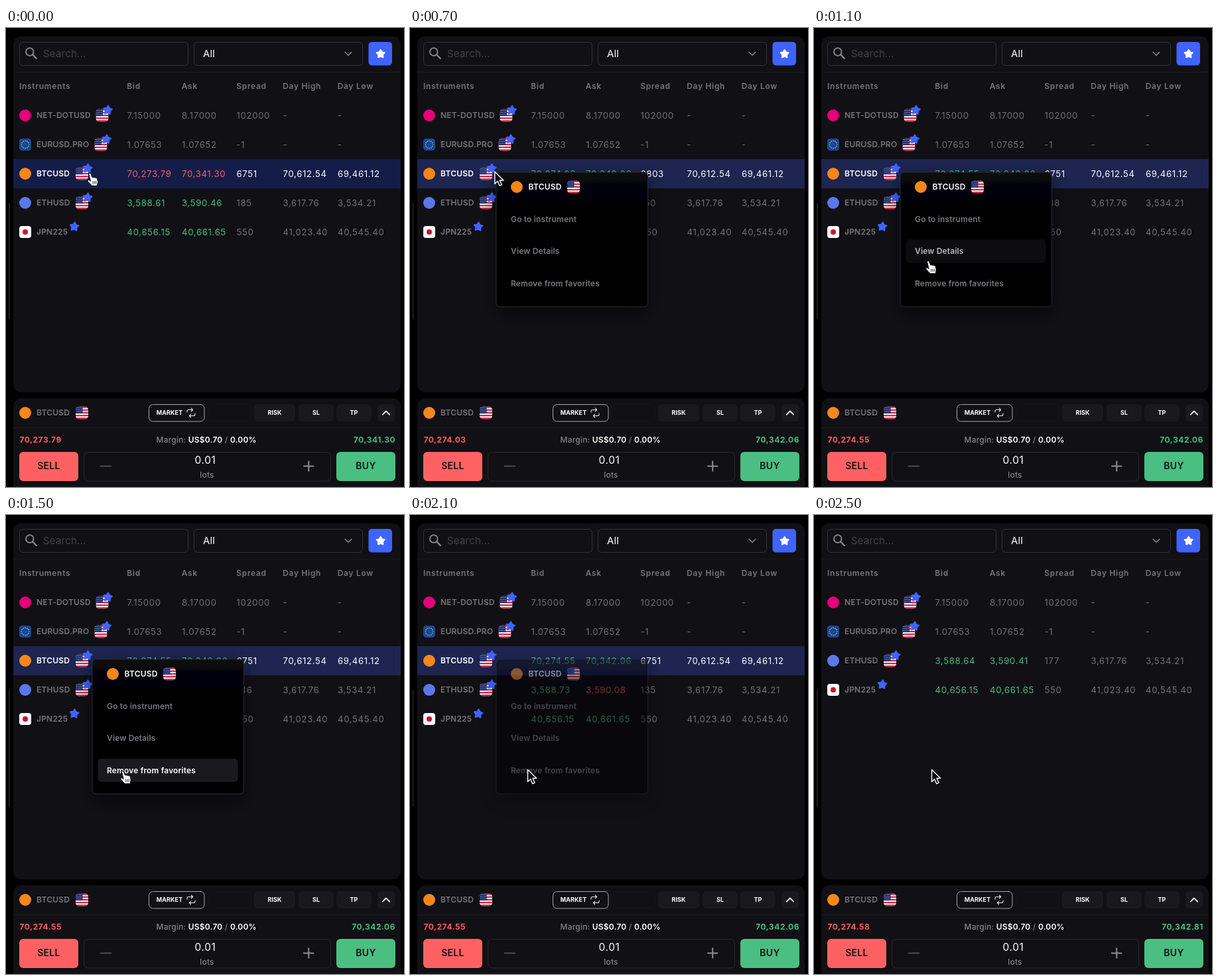
An HTML page for the animation above (2.6 s loop, 600 by 693 pixels).

```html
<!DOCTYPE html>
<html lang="en">
<head>
<meta charset="utf-8">
<title>Watchlist</title>
<style>
html, body { margin: 0; width: 100%; height: 100%; overflow: hidden; background: #000; }
svg { display: block; width: 600px; height: 693px; font-family: Inter, sans-serif; }
text { white-space: pre; }
.head { font-size: 12px; font-weight: 600; letter-spacing: .7px; fill: #75747a; }
.name { font-size: 12px; font-weight: 600; letter-spacing: .2px; fill: #75747a; }
.num { font-size: 13.2px; letter-spacing: .65px; fill: #717076; }
.item { font-size: 12px; font-weight: 600; letter-spacing: .15px; }
.price { font-size: 12px; font-weight: 700; letter-spacing: .5px; }
.margin { font-size: 12px; font-weight: 500; letter-spacing: .2px; fill: #85848a; }
.tiny { font-size: 9px; font-weight: 700; letter-spacing: .1px; fill: #fff; text-anchor: middle; }
.trade { font-size: 14px; font-weight: 600; letter-spacing: .3px; fill: #111015; text-anchor: middle; }
.line { fill: none; stroke-linecap: round; stroke-linejoin: round; }
</style>
</head>
<body>
<svg id="stage" viewBox="0 0 600 693"></svg>
<script>
const LOOP = 2600, STEP = 100;
const RED = '#ff5a5e', GREEN = '#41c07c', BLUE = '#3f64ff', WHITE = '#fff', GRAY = '#717076';
const COLS = [182.5, 265, 347.5, 417.5, 500];

const text = (x, y, str, cls, extra = '') => `<text x="${x}" y="${y}" class="${cls}" ${extra}>${str}</text>`;
const box = (x, y, w, h, r, fill, extra = '') =>
  `<rect x="${x}" y="${y}" width="${w}" height="${h}" rx="${r}" fill="${fill}" ${extra}/>`;
const line = (d, color, w) => `<path class="line" d="${d}" stroke="${color}" stroke-width="${w}"/>`;
const dot = (x, y, r, fill) => `<circle cx="${x}" cy="${y}" r="${r}" fill="${fill}"/>`;

function star(x, y, r, fill, turn = 0) {
  const pts = Array.from({ length: 10 }, (_, i) => {
    const a = i * Math.PI / 5 - Math.PI / 2 + turn, q = i % 2 ? r * .56 : r;
    return `${(x + q * Math.cos(a)).toFixed(2)},${(y + q * Math.sin(a)).toFixed(2)}`;
  });
  return `<polygon points="${pts.join(' ')}" fill="${fill}" stroke="${fill}" stroke-width="2" stroke-linejoin="round"/>`;
}

function usFlag(x, y) {
  let s = `<g transform="translate(${x - 9.5} ${y - 9.5})" clip-path="url(#flag)">` + box(0, 0, 19, 19, 0, '#f4f1f4');
  for (let i = 0; i < 5; i++) s += box(0, i * 4.2, 19, 2.1, 0, '#d5203f');
  s += box(0, 0, 10.5, 10.4, 0, '#1c2f70');
  for (let i = 0; i < 12; i++) s += dot(1.8 + i % 4 * 2.3, 2 + Math.floor(i / 4) * 3, .5, '#c9d0ea');
  return s + '</g>';
}

function euFlag(x, y) {
  let s = box(x - 9, y - 9, 18, 18, 4.5, '#17479e');
  for (let i = 0; i < 12; i++) {
    const a = i * Math.PI / 6;
    s += dot(x + 5.6 * Math.cos(a), y + 5.6 * Math.sin(a), .85, '#a9b84a');
  }
  return s;
}

const ROWS = [
  { id: 'dot', name: 'NET-DOTUSD', icon: dot(29, 0, 9, '#e6007a'), flag: 145, vals: ['7.15000', '8.17000', '102000', '-', '-'] },
  { id: 'eur', name: 'EURUSD.PRO', icon: euFlag(29, 0), flag: 143, vals: ['1.07653', '1.07652', '-1', '-', '-'] },
  { id: 'btc', name: 'BTCUSD', icon: dot(29, 0, 9, '#f7861b'), flag: 114.5, vals: ['', '', '', '70,612.54', '69,461.12'] },
  { id: 'eth', name: 'ETHUSD', icon: dot(29, 0, 9, '#5b78ea'), flag: 114.5, vals: ['', '', '', '3,617.76', '3,534.21'] },
  { id: 'jpn', name: 'JPN225', icon: box(20, -9, 18, 18, 4, WHITE) + dot(29, 0, 4, '#c8102e'), star: 103,
    vals: ['40,656.15', '40,661.65', '550', '41,023.40', '40,545.40'] }
];

function row(r) {
  const active = r.id === 'btc';
  const cells = r.vals.map((v, i) => {
    const fill = r.id === 'jpn' && i < 2 ? GREEN : active ? WHITE : GRAY;
    return text(COLS[i], 4.8, v, 'num', `id="${r.id}${i}" style="fill:${fill}"`);
  }).join('');
  return `<g id="${r.id}">` + (active ? box(11, -22, 584, 44, 0, '#141d47', 'id="glow"') : '') +
    r.icon + text(46, 4.4, r.name, 'name', active ? 'style="fill:#fff"' : '') +
    (r.flag ? usFlag(r.flag, 0) : '') + star(r.star || r.flag + 8.5, -8, 6.7, BLUE, .1) + cells + '</g>';
}

const ITEMS = ['Go to instrument', 'View Details', 'Remove from favorites'];
const menu = '<g id="menu">' +
  box(130, 218, 228.5, 203, 6, 'url(#shade)', 'stroke="#2b2b30" filter="url(#drop)"') +
  dot(161, 240, 9, '#f7861b') + text(178.5, 244.4, 'BTCUSD', 'name', 'style="fill:#fff"') + usFlag(246.5, 240) +
  ITEMS.map((s, i) => box(138.5, 271 + i * 48.5, 211, 35, 5, '#1a191e', `id="hover${i}"`) +
    text(152, 292.6 + i * 48.5, s, 'item', `id="item${i}"`)).join('') + '</g>';

const chip = (x, w, label) => box(x, 568, w, 26, 6, '#1a191e') + text(x + w / 2, 584.3, label, 'tiny');

const order = box(11, 559, 584, 150, 12, '#111015') + box(11, 603, 584, 1, 0, '#1b1a1f') +
  dot(29, 581, 9, '#f7861b') + text(46, 585.4, 'BTCUSD', 'name') + usFlag(114.5, 581) +
  box(215.5, 568.5, 83.5, 25.5, 6, '#111015', 'stroke="#a6a5aa"') + text(246.5, 584.3, 'MARKET', 'tiny') +
  line('M273 580v-1.5q0-2 2-2h6.5M279.3 574.2l2.3 2.3-2.3 2.3M285 582v1.5q0 2-2 2h-6.5M278.7 583.2l-2.3 2.3 2.3 2.3', '#e8e8ea', 1.1) +
  box(304.5, 568.5, 65, 25, 6, 'none', 'stroke="#16151a"') +
  chip(374, 62, 'RISK') + chip(441, 53, 'SL') + chip(498, 53, 'TP') + box(560, 568, 26.5, 26, 6, '#1a191e') +
  line('M567.8 583.7l5.2-5.2 5.2 5.2', WHITE, 1.8) +
  text(20.5, 626, '', 'price', `id="sell" fill="${RED}"`) +
  text(587, 626, '', 'price', `id="buy" fill="${GREEN}" text-anchor="end"`) +
  text(226.5, 626, 'Margin: <tspan fill="#fff" font-weight="600">US$0.70</tspan> / <tspan fill="#fff" font-weight="600">0.00%</tspan>', 'margin') +
  box(20, 640, 89, 44, 6, '#ff6163') + text(64.5, 666, 'SELL', 'trade') +
  box(498, 640, 89, 44, 6, '#4abf81') + text(542.5, 666, 'BUY', 'trade') +
  box(117.5, 640.5, 372, 43.5, 6, '#111015', 'stroke="#29282d"') +
  line('M142.5 661.5h16', '#4b4a50', 2) + line('M449 661.5h14.5M456.3 654.3v14.5', '#8f8e94', 2) +
  text(300.5, 658, '0.01', 'num', 'text-anchor="middle" style="font-size:15.5px;fill:#fff"') +
  text(303, 679, 'lots', 'margin', 'text-anchor="middle"');

const list = box(11, 12.5, 584, 537.5, 12, '#111015') + box(11, 66, 584, 1, 0, '#1a191e') +
  box(20.5, 21.5, 254, 35, 5, '#111015', 'stroke="#333238"') +
  '<circle cx="35.8" cy="36" r="5.8" fill="none" stroke="#85848a" stroke-width="2"/>' +
  line('M40.3 40.5l5.4 5.4', '#85848a', 2.4) +
  text(56, 44, 'Search...', '', 'font-size="15" letter-spacing=".2" fill="#424147"') +
  box(283.5, 21.5, 254, 35, 5, '#111015', 'stroke="#333238"') +
  text(297, 43.6, 'All', '', 'font-size="15" letter-spacing=".1" fill="#fff"') +
  line('M511.2 36.5l4.8 4.8 4.8-4.8', '#85848a', 1.6) +
  box(546.5, 21, 35.5, 35.5, 5, BLUE) + star(564.7, 39.2, 6.3, WHITE) +
  ['Instruments', 'Bid', 'Ask', 'Spread', 'Day High', 'Day Low']
    .map((s, i) => text(i ? COLS[i - 1] - .3 : 20, 92, s, 'head')).join('');

const cursors = '<g id="cursor">' +
  '<path id="arrow" d="M0 0v18.2l4.2-4 3 7 3.3-1.4-2.9-6.8h5.6z" fill="#0c0c0e" stroke="#fff" stroke-width="1.4" stroke-linejoin="round"/>' +
  '<g id="hand" transform="translate(-6 2)"><path d="M3.2 2c-.3-2 2.4-2.4 3-.6l2 5.3c.5-1 2.2-1 2.5.3.7-.9 2.2-.7 2.5.6.9-.8 2.4-.3 2.6 1.2l.8 4c.3 2-.8 3.2-.8 6.4H7.2c-.6-2-3.3-3.600-5.300-6.200-1.400-1.800.6-3.300 2.300-1.900l1.500 1.100z" fill="#fff" stroke="#08080a" stroke-width="1"/>' +
  '<path d="M9 12.500l.3 4M11.400 12.300l.3 4M13.700 12.100l.2 4" stroke="#111" stroke-width=".9"/></g></g>';

const stage = document.getElementById('stage');
stage.innerHTML = '<defs><clipPath id="flag"><rect width="19" height="19" rx="5"/></clipPath>' +
  '<linearGradient id="shade" x2="0" y2="1"><stop stop-color="#08080e"/><stop offset=".3" stop-color="#020203"/><stop offset="1" stop-color="#000"/></linearGradient>' +
  '<filter id="drop" x="-20%" y="-20%" width="140%" height="150%"><feDropShadow dx="0" dy="10" stdDeviation="12" flood-color="#000" flood-opacity=".55"/></filter></defs>' +
  box(4, 264, 1.5, 176, .7, '#252429') + list + ROWS.map(row).join('') + order + menu + cursors;

const $ = id => document.getElementById(id);
const set = (id, k, v) => $(id).setAttribute(k, v);
const clamp = v => Math.max(0, Math.min(1, v));
const ramp = (t, a, b) => clamp((t - a) / (b - a));
const ease = v => v * v * (3 - 2 * v);
const mix = (a, b, k) => a + (b - a) * k;
const shade = (a, b, k) => `rgb(${a.map((v, i) => Math.round(mix(v, b[i], k)))})`;
const money = v => v.toLocaleString('en-US', { minimumFractionDigits: 2, maximumFractionDigits: 2 });

// time, bid, ask, colours
const BTC = [
  [0, 70273.79, 70341.30, RED, RED], [500, 70274.03, 70342.06, GREEN, GREEN],
  [1000, 70274.55, 70342.06, GREEN, GREEN], [2200, 70273.77, 70342.56, RED, GREEN],
  [2400, 70274.58, 70342.81, GREEN, GREEN]
];
const ETH = [
  [0, 3588.61, 3590.46, GREEN, GREEN], [600, 3588.62, 3590.12, GREEN, RED],
  [1000, 3588.58, 3590.46, RED, GREEN], [1400, 3588.62, 3590.08, GREEN, RED],
  [1800, 3588.73, 3590.08, GREEN, RED], [2200, 3588.62, 3590.08, GREEN, RED],
  [2400, 3588.64, 3590.41, GREEN, GREEN]
];
const PATH = [[0, 127.8, 217], [700, 127.8, 217], [1100, 173.5, 349.5], [1400, 177.5, 384.5], [LOOP, 177.5, 384.5]];

function quote(id, ticks, t) {
  const [, bid, ask, c1, c2] = ticks.filter(q => q[0] <= t).pop();
  [[money(bid), c1], [money(ask), c2]].forEach(([s, c], i) => {
    $(id + i).textContent = s;
    $(id + i).style.fill = c;
  });
  $(id + 2).textContent = Math.round((ask - bid) * 100);
  return [money(bid), money(ask)];
}

function pointer(t) {
  const i = Math.max(1, PATH.findIndex(p => p[0] > t));
  const a = PATH[i - 1], b = PATH[i], k = ease(ramp(t, a[0], b[0]));
  return [mix(a[1], b[1], k), mix(a[2], b[2], k)];
}

function draw(t) {
  const [sell, buy] = quote('btc', BTC, t);
  quote('eth', ETH, t);
  $('sell').textContent = sell;
  $('buy').textContent = buy;

  const removed = t >= 2400;
  let slot = 0;
  ROWS.forEach(r => {
    const gone = removed && r.id === 'btc';
    set(r.id, 'visibility', gone ? 'hidden' : 'visible');
    set(r.id, 'transform', `translate(0 ${132 + 44 * slot})`);
    if (!gone) slot++;
  });
  set('glow', 'fill', shade([20, 29, 71], [29, 37, 80], ramp(t, 0, 300)));

  set('menu', 'opacity', ramp(t, 0, 300) * (1 - ramp(t, 1950, 2250)));
  const hovers = [
    ramp(t, 800, 950) * (1 - ramp(t, 950, 1100)),
    ramp(t, 1000, 1200) * (1 - ramp(t, 1200, 1400)),
    ramp(t, 1250, 1450) * (1 - ramp(t, 1800, 2000))
  ];
  hovers.forEach((k, i) => {
    set('hover' + i, 'opacity', k);
    set('item' + i, 'fill', shade([121, 120, 126], [255, 255, 255], k));
  });

  const hand = t < 100 || (t >= 900 && t < 1800);
  set('cursor', 'transform', `translate(${pointer(t)})`);
  set('hand', 'visibility', hand ? 'visible' : 'hidden');
  set('arrow', 'visibility', hand ? 'hidden' : 'visible');
}

const start = performance.now();
function tick() {
  const t = (performance.now() - start) % LOOP;
  draw(Math.floor(t / STEP) * STEP);
  requestAnimationFrame(tick);
}
tick();
</script>
</body>
</html>
```
